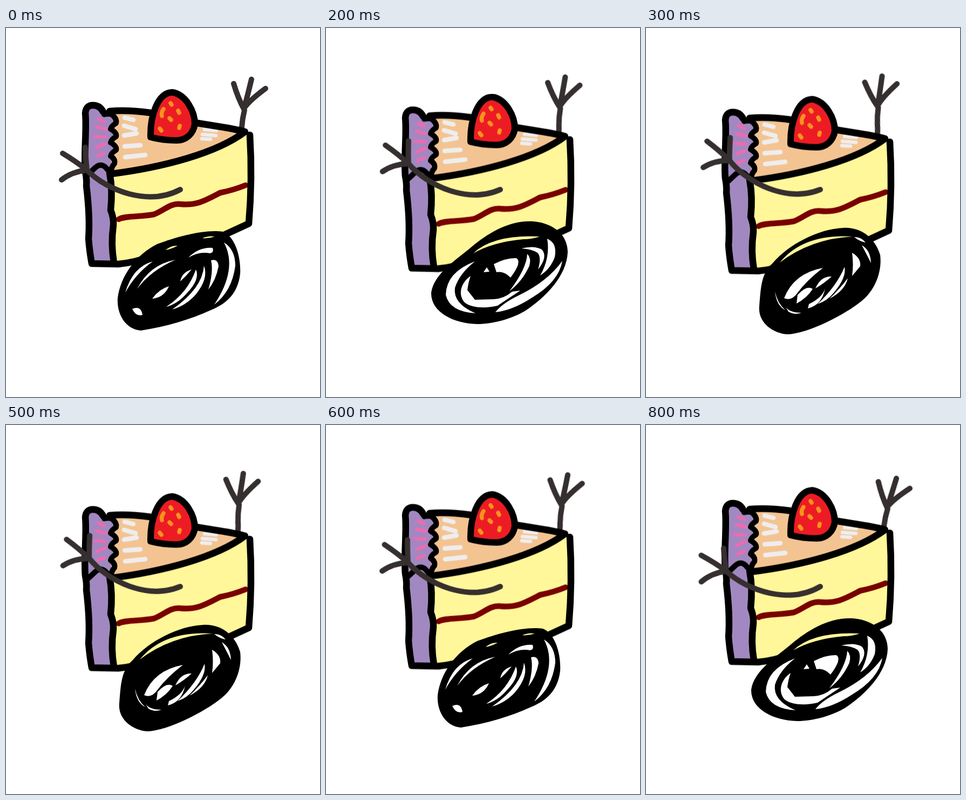
An HTML page that plays this animation: 582x683 px, repeating every 900 ms.

```html
<!DOCTYPE html>
<html lang="en">
<head>
<meta charset="utf-8">
<title>Cake on a wheel</title>
<style>
  html, body { margin: 0; width: 100%; height: 100%; overflow: hidden; background: #fff; }
  svg { display: block; width: 100%; height: 100%; }
  path { stroke-linecap: round; stroke-linejoin: round; }

  .ink { fill: none; stroke: #000; stroke-width: 12.5; }
  .scallop { stroke-width: 10; }
  .arm path { fill: none; stroke: #362f2f; stroke-width: 10; }
  .cream { fill: none; stroke: #efedee; stroke-width: 8.5; }
  .thin { stroke-width: 6.5; }
  .icing { fill: none; stroke: #ef6bb0; stroke-width: 6; }
  .seeds { fill: none; stroke: #f7931e; stroke-width: 7.5; }
  .gap { fill: #fff; }
  .cake-gap { fill: #fff799; }

  .body, .arm, .wheel { animation: 900ms infinite; }
  .body { animation-name: bob; }
  .left { animation-name: wave-left; transform-origin: 323px 299px; }
  .right { animation-name: wave-right; transform-origin: 390px 259px; }
  .wheel { animation-timing-function: step-end; }
  .a { animation-name: show-a; }
  .b { animation-name: show-b; }
  .c { animation-name: show-c; }

  /* four steps out, five steps back */
  @keyframes bob {
    0% { transform: translateY(0); animation-timing-function: steps(4); }
    44.444% { transform: translateY(17px); animation-timing-function: steps(5); }
    100% { transform: translateY(-2px); }
  }
  @keyframes wave-left {
    0% { transform: rotate(0deg); animation-timing-function: steps(4); }
    44.444% { transform: rotate(8deg); animation-timing-function: steps(5); }
    100% { transform: rotate(-5deg); }
  }
  @keyframes wave-right {
    0% { transform: rotate(0deg); animation-timing-function: steps(4); }
    44.444% { transform: rotate(-8deg); animation-timing-function: steps(5); }
    100% { transform: rotate(6deg); }
  }
  @keyframes show-a { 0%, 66.666% { opacity: 1; } 11.111%, 88.888%, 100% { opacity: 0; } }
  @keyframes show-b { 0%, 33.333% { opacity: 0; } 11.111%, 88.888%, 100% { opacity: 1; } }
  @keyframes show-c { 0%, 66.666%, 100% { opacity: 0; } 33.333% { opacity: 1; } }
</style>
</head>
<body>
<svg viewBox="0 0 582 683">
  <g class="arm right">
    <path d="M434 206Q437 194 437 184Q438 168 442 152M422 103Q430 130 441 150Q449 120 455 95M441 149Q450 135 481 112"/>
  </g>

  <g class="body">
    <path fill="#f3c492" d="M185 154Q230 151 270 158Q360 172 445 190Q340 250 197 269Z"/>
    <path fill="#a288c0" d="M147 155Q150 140 166 142L182 158L196 162L203 175L194 187L203 200L194 212L203 225L194 238L197 268L200 436L158 436Q155 300 147 270Z"/>
    <path fill="#fff799" d="M195 270C290 258 390 232 449 196Q457 280 449 362L385 392L255 425L203 437Q197 400 200 360Q192 330 195 270Z"/>

    <path class="icing" d="M171 168L182 173M168 183L185 187M165 201L184 202M168 221L184 214M170 237L182 232"/>
    <path class="cream" d="M220 166L236 170M219 181L240 187M219 199L242 195M220 219L249 217M221 239L258 235"/>
    <path class="cream thin" d="M368 188L390 190M364 197L389 199M363 205L379 206"/>
    <path fill="none" stroke="#790000" stroke-width="10.5" d="M209 354C222 347 250 350 274 345C293 338 304 324 323 326C354 329 370 319 397 305Q422 300 444 291"/>

    <path class="ink" d="M180 155Q174 143 161 143Q148 143 147 158C150 185 144 235 147 266Q150 280 149 292Q156 350 153 390Q155 415 159 436L208 437Q240 434 270 422L385 392L450 362Q457 280 452 198"/>
    <path class="ink" d="M195 270C290 258 390 232 443 192C410 183 380 181 350 175M268 157Q225 151 192 154"/>
    <path class="ink scallop" d="M182 160Q190 158 196 160Q206 168 204 176Q195 182 194 187Q206 194 204 201Q195 206 194 212Q206 219 204 226Q195 231 194 237Q203 243 201 251Q194 258 195 270"/>
    <path class="ink scallop" d="M152 271L166 258Q178 248 188 262"/>
    <path class="ink" d="M192 268Q198 300 194 337Q200 352 199 365Q194 400 200 434"/>

    <path fill="#ed1c24" stroke="#000" stroke-width="12" d="M268 202C267 165 280 120 308 119C334 123 350 155 350 178C347 196 334 208 316 208Q290 208 268 202Z"/>
    <path class="seeds" d="M305 139L307 142M319 153L321 157M292 150Q287 157 289 163M303 167L306 170M322 181L321 185M285 186L288 190"/>
  </g>

  <g class="arm left">
    <path d="M150 263C188 302 265 330 323 299M105 232Q130 247 150 263Q148 245 147 221M103 281Q122 266 150 263"/>
  </g>

  <g class="wheel a">
    <path d="M250 560C222 558 205 530 207 500C212 460 240 420 280 400C320 385 370 372 402 377C425 386 436 425 434 455C430 490 410 510 380 522C340 540 300 552 250 560Z"/>
    <path class="cake-gap" d="M296 411Q306 402 318 403Q307 409 296 411ZM364 389Q375 384 387 386Q376 390 364 389Z"/>
    <path class="gap" d="M221 490Q235 442 272 432Q239 456 221 490Z
      M243 483Q266 438 314 429Q268 449 243 483Z
      M234 520Q250 513 253 531Q241 535 234 520Z
      M271 501Q284 483 302 478Q293 499 271 501Z
      M323 469Q326 452 344 447Q334 459 323 469Z
      M352 447Q360 465 336 490Q318 511 297 516Q337 490 352 447Z
      M367 440Q376 464 351 494Q333 514 308 521Q364 482 367 440Z
      M338 425Q358 405 383 407Q386 416 378 417Q358 413 338 425Z
      M380 430Q393 426 394 441Q389 467 375 484Q385 450 380 430Z
      M404 397Q425 410 425 440Q419 487 386 512Q430 446 404 397Z"/>
  </g>

  <g class="wheel b">
    <path d="M280 548C235 547 194 525 195 490C200 455 240 430 270 405C300 380 340 355 385 358C425 362 448 385 448 415C446 460 405 500 370 523C345 538 310 548 280 548Z"/>
    <path class="cake-gap" d="M273 417Q310 382 396 386Q382 391 366 391Q310 396 273 417Z"/>
    <path class="gap" d="M276 432Q223 452 222 494Q229 525 277 528Q235 510 239 481Q247 455 276 432Z
      M268 459C248 473 245 495 257 508C270 519 298 519 318 514Q336 502 360 486L345 488Q330 501 311 502L276 503L262 485Q264 470 268 459Z
      M311 437Q334 425 353 426Q364 433 342 462Q330 449 316 452Z
      M292 452L298 443L303 451Z
      M362 408Q386 402 400 410Q412 423 393 447Q400 424 392 416Q381 409 362 408Z
      M373 418Q381 426 377 440Q364 469 340 487Q372 445 373 418Z
      M410 390Q429 398 424 424Q416 446 397 458Q416 425 410 390Z
      M438 431Q432 469 382 499Q345 523 314 526Q326 510 357 495Q411 469 438 431Z"/>
  </g>

  <g class="wheel c">
    <path d="M262 567C235 565 207 545 210 515C213 480 213 455 235 435C265 400 320 372 365 370C400 368 425 390 434 420C438 450 425 485 400 505C370 530 300 566 262 567Z"/>
    <path class="cake-gap" d="M248 434Q292 380 383 386Q306 390 248 434Z"/>
    <path class="gap" d="M386 387Q398 386 407 397Q396 395 386 387Z
      M400 402Q416 411 417 435Q410 421 400 402Z
      M382 416Q399 426 397 441L382 459Q385 438 382 416Z
      M256 500Q274 454 328 444Q298 467 281 490Q270 506 256 500Z
      M281 494Q298 475 309 483Q298 500 279 510Z
      M314 482Q324 459 344 460Q331 472 314 482Z
      M302 511Q327 499 332 482Q326 513 300 519Z
      M368 442Q372 462 348 490Q336 505 318 511Q354 477 368 442Z
      M374 463Q369 486 340 501Q360 482 374 463Z
      M239 488Q242 514 258 522Q244 510 239 488Z
      M257 513Q263 527 288 527Q276 532 264 525Z"/>
  </g>
</svg>
</body>
</html>
```
